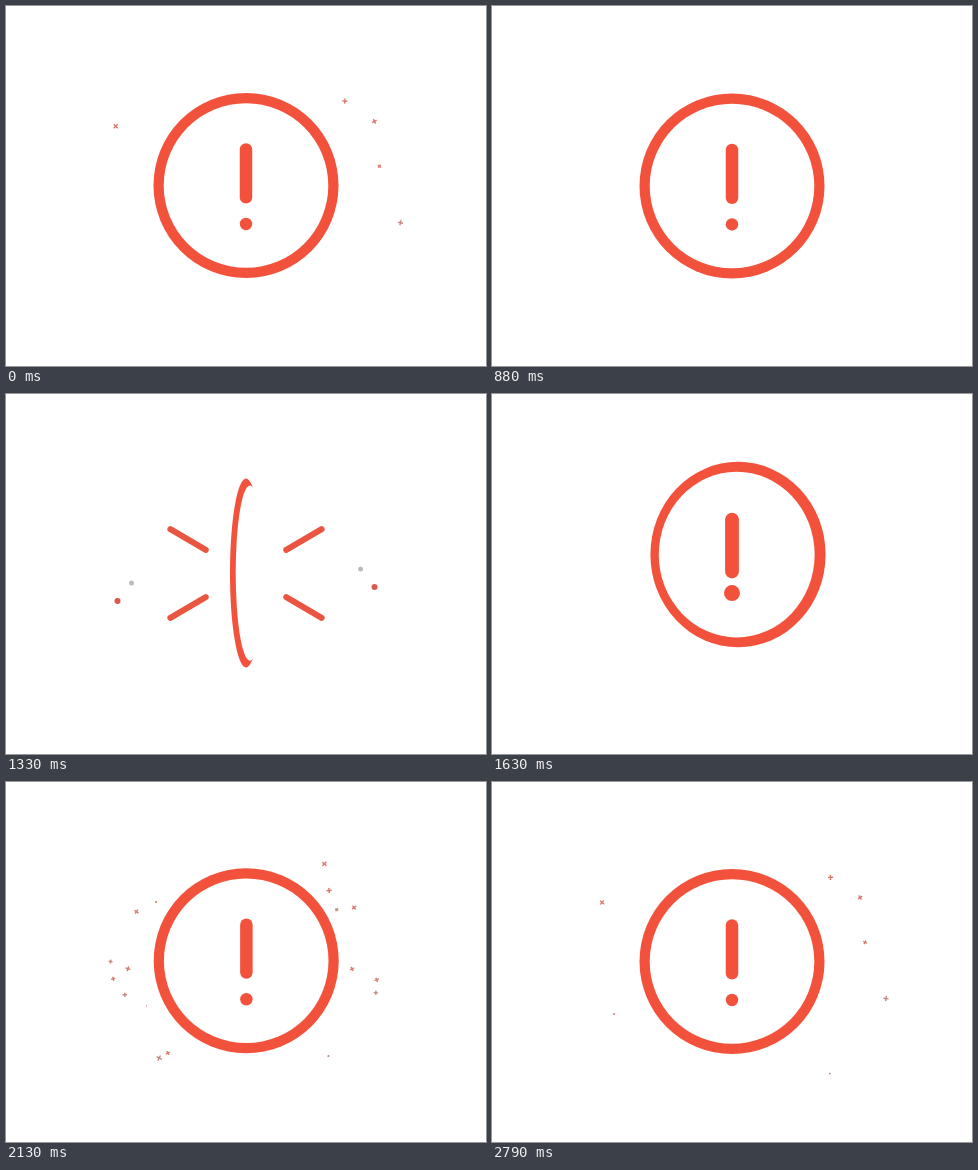
Recreate the animation shown at these times as an HTML page with a canvas. Size 480 px wide and 360 px high, loop 2.83 s.

```html
<!DOCTYPE html>
<html>
<head>
<meta charset="utf-8">
<style>
html, body { margin: 0; width: 100%; height: 100%; overflow: hidden; background: #fff; }
canvas { display: block; }
</style>
</head>
<body>
<canvas id="stage" width="480" height="360"></canvas>
<script>
const ctx = document.getElementById('stage').getContext('2d');
const LOOP = 2830, CX = 240, CY = 179.5, RED = '#f2523b', SPARKS = 18;
const { PI, sin, cos, exp, min, max, abs, floor } = Math;

const clamp = v => max(0, min(1, v));
const inOut = p => (1 - cos(PI * clamp(p))) / 2;
const outCubic = p => 1 - (1 - clamp(p)) ** 3;
// Smooth rise from a to peak, then fall to b
const bump = (t, a, peak, b) => inOut(t < peak ? (t - a) / (peak - a) : (b - t) / (b - peak));

// Repeatable random number in 0..1
function rand(i, n) {
  const v = sin(i * 12.9898 + n * 78.233) * 43758.5453;
  return v - floor(v);
}

// Dip, leap and settle: [time, height offset]
const HOP = [[870, 0], [1110, 88], [1480, -48], [1775, 8], [1960, -1.5], [2300, 0]];

function hop(t) {
  let v = 0;
  for (let i = 1; i < HOP.length; i++) {
    const [a, from] = HOP[i - 1], [b, to] = HOP[i];
    if (t >= a) v = from + (to - from) * inOut((t - a) / (b - a));
  }
  return v;
}

function ellipse(x, y, rx, ry, color) {
  ctx.fillStyle = color;
  ctx.beginPath();
  ctx.ellipse(x, y, rx, ry, 0, 0, 2 * PI);
  ctx.fill();
}

function line(x1, y1, x2, y2, width, color) {
  ctx.lineWidth = width;
  ctx.strokeStyle = color;
  ctx.beginPath();
  ctx.moveTo(x1, y1);
  ctx.lineTo(x2, y2);
  ctx.stroke();
}

// Small crosses drift outwards to the left and right, across the loop's end
function drawSparks(t) {
  if (t < 870) t += LOOP;
  ctx.lineCap = 'butt';
  for (let i = 0; i < SPARKS; i++) {
    const birth = 1750 + 450 * rand(i, 1);
    const death = birth + 400 + 770 * rand(i, 2) ** 1.5;
    const r = (2 + rand(i, 3)) * clamp(min(t - birth, death - t) / 130);
    if (r <= 0) continue;
    const angle = i * PI + 1.8 * (rand(i, 4) - .5);
    const dist = (122 + 40 * rand(i, 5)) * (1.025 - .3 * exp((1960 - t) / 350));
    const tint = i % 3 ? '#d9786d' : '#c28a82';
    ctx.save();
    ctx.translate(CX + dist * cos(angle), CY + dist * sin(angle));
    ctx.rotate(i + t / 400);
    line(-r, 0, r, 0, 1.4, tint);
    line(0, -r, 0, r, 1.4, tint);
    ctx.restore();
  }
}

function drawRing(t, y, turn) {
  const c = abs(cos(turn)), s = sin(turn);
  const x = CX + 6 * bump(t, 1330, 1630, 2200);
  ellipse(x, y, 92.5 * c, 92.5 + 2 * s * s, RED);
  ellipse(x + 4 * s, y, 82.3 * c, 82.3 + 5.5 * s * s, '#fff');
}

function drawMark(t, y, turn) {
  if (cos(turn) <= 0) return;
  const swell = bump(t, 1400, 1620, 1800), dot = 6.2 + 1.8 * swell;
  ctx.save();
  ctx.translate(CX + 2 * bump(t, 1630, 1960, 2200), y);
  ctx.scale(min(1, cos(turn) * 1.1), 1);
  line(0, -36 + swell, 0, 11.8 + 5.2 * swell, 12.5 + 1.3 * swell, RED);
  ellipse(0, 38.5, dot, dot, RED);
  ctx.restore();
}

function drawRays(t) {
  const p = (t - 1190) / 300;
  if (p <= 0 || p >= 1) return;
  const head = 103 * outCubic(p), tail = 103 * inOut(p);
  for (const sx of [-1, 1]) for (const sy of [-1, 1]) {
    const dx = sx * cos(.53), dy = sy * sin(.53);
    line(CX + dx * tail, CY + dy * tail, CX + dx * head, CY + dy * head, 6, '#ea5542');
  }
}

function drawDots(t) {
  const k = outCubic((t - 1150) / 180), fade = clamp((1460 - t) / 120);
  for (const side of [-1, 1]) for (const i of [0, 1]) {
    const r = (3 - i / 2) * fade;
    const x = side * (128.5 - 14 * i), y = 20.5 - 18 * i - 7 * side;
    if (k > 0) ellipse(CX + x * k, CY + y * k, r, r, i ? '#bbb' : '#d85a4c');
  }
}

function draw(now) {
  const t = now % LOOP;
  const y = CY + hop(t);
  const turn = 2 * PI * inOut((t - 1119) / 600);
  ctx.fillStyle = '#fff';
  ctx.fillRect(0, 0, 480, 360);
  drawSparks(t);
  ctx.lineCap = 'round';
  drawRing(t, y, turn);
  drawRays(t);
  drawDots(t);
  drawMark(t, y, turn);
}

const start = performance.now();
function tick() {
  draw(performance.now() - start);
  requestAnimationFrame(tick);
}
tick();
</script>
</body>
</html>
```
